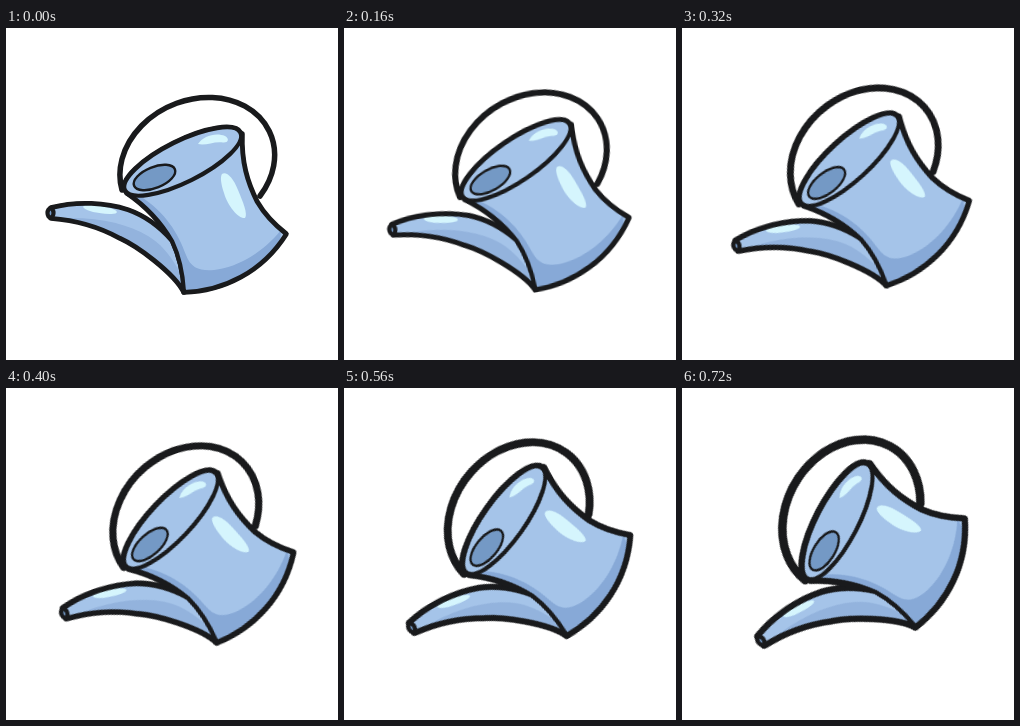
Animation, 332 px wide and 332 px high, one loop 1200 ms. Source, as an HTML page:

```html
<!DOCTYPE html>
<html lang="en">
<head>
<meta charset="utf-8">
<title>Watering can</title>
<style>
  html, body { margin: 0; width: 100%; height: 100%; overflow: hidden; background: #fff; }
  svg { display: block; width: 100%; height: 100%; }
  #can { transform-box: view-box; transform-origin: 166px 166px; }
  #edge, .line { fill: none; stroke: #191a1c; stroke-linecap: round; stroke-linejoin: round; }
  .line { stroke-width: 4.2; }
  .thin { stroke-width: 2.4; }
  .base { fill: #a5c4e9; }
  .shade { fill: #87a9d7; }
  .soft { fill: #93b3dd; }
  .dark { fill: #7499c5; }
  .shine { fill: #d5f5fd; }
</style>
</head>
<body>
<svg viewBox="0 0 332 332">
  <defs>
    <path id="spout" d="M45 180 C72 173 100 175 122 182 C139 188 152 197 166 213 C174 230 177 247 178 264 C173 254 163 244 148 232 C138 224 127 216 114 210 C94 199 72 192 45 190 Z"/>
    <path id="body" d="M121 165 C140 178 155 194 166 213 C174 230 177 247 178 264 C217 263 256 244 280 206 C267 196 258 186 251 174 C241 154 235 134 236 106 Z"/>
    <ellipse id="rim" cx="176.7" cy="133.5" rx="64.5" ry="20.5" transform="rotate(-26.5 176.7 133.5)"/>
    <clipPath id="inSpout"><use href="#spout"/></clipPath>
    <clipPath id="inBody"><use href="#body"/></clipPath>
  </defs>
  <g id="can">
    <!-- outer contour, drawn under the fills -->
    <g id="edge">
      <path d="M116 162 A79.5 65 -23.5 1 1 254 168"/>
      <use href="#spout"/>
      <use href="#body"/>
      <use href="#rim"/>
    </g>

    <use href="#spout" class="base"/>
    <path class="soft" clip-path="url(#inSpout)" d="M58 190 C94 189 122 196 142 208 C157 217 167 230 180 256 L178 270 L90 230 Z"/>
    <ellipse class="shine" cx="94" cy="181.5" rx="17" ry="3.6" transform="rotate(9 94 181.5)"/>
    <use href="#spout" class="line"/>
    <g class="dark"><ellipse cx="44.5" cy="185" rx="3" ry="4.6"/></g>
    <ellipse class="line" cx="44.5" cy="185" rx="3" ry="4.6"/>

    <use href="#body" class="base"/>
    <path class="shade" clip-path="url(#inBody)" d="M134 168 C160 185 172 205 180 227 C185 241 195 243 208 242 C234 239 258 223 275 202 L270 270 L170 275 L120 170 Z"/>
    <path class="shine" d="M216 146 C220 143 227 149 232 162 C237 174 242 186 239 190 C233 191 222 179 218 165 C215 156 214 149 216 146 Z"/>
    <use href="#body" class="line"/>

    <use href="#rim" class="base"/>
    <use href="#rim" class="line"/>
    <path class="shine" d="M192 116 C197 108 210 104 219 108 C224 111 222 115 217 114.500 C208 113 200 118 192 116 Z"/>
    <g class="dark" transform="rotate(-22 148.5 149.5)">
      <ellipse cx="148.5" cy="149.5" rx="22" ry="10.5"/>
      <ellipse class="line thin" cx="148.5" cy="149.5" rx="22" ry="10.5"/>
    </g>
  </g>
</svg>
<script>
  const loop = 1200, step = 80, tilt = -4, last = 9;
  const edgeStart = 5.5, edgeEnd = 8.5;

  // Plays pose 0 to last in hard steps, then holds until the loop ends.
  function play(id, pose) {
    const key = (n, offset) => ({ ...pose(n), offset, easing: 'steps(1, end)' });
    const keys = Array.from({ length: last + 1 }, (_, n) => key(n, n * step / loop));
    keys.push(key(last, 1));
    document.getElementById(id).animate(keys, { duration: loop, iterations: Infinity });
  }

  play('can', n => ({ transform: `rotate(${n * tilt}deg)` }));
  play('edge', n => ({ strokeWidth: `${edgeStart + (edgeEnd - edgeStart) * n / last}px` }));
</script>
</body>
</html>
```
